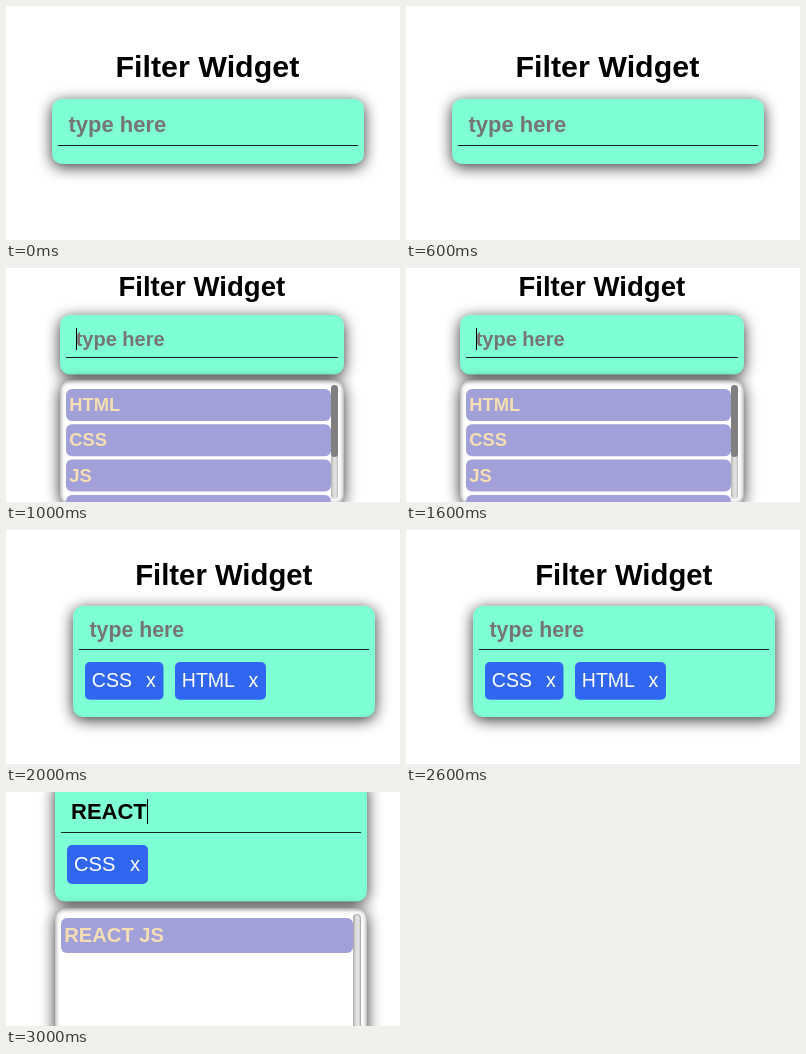
Animation, 394 px wide and 234 px high, one loop 4 s. Source, as an HTML page:

```html
<!DOCTYPE html>
<html lang="en">
<head>
<meta charset="utf-8">
<title>Filter Widget</title>
<style>
  html, body { margin: 0; width: 100%; height: 100%; overflow: hidden; background: #fff; }
  svg { display: block; width: 100%; height: 100%; }
  text { font-family: "Liberation Sans", Arial, sans-serif; white-space: pre; }
  .bold { font-weight: 700; }
</style>
</head>
<body>
<svg id="stage" viewBox="0 0 394 234">
  <defs>
    <filter id="soft" x="-100" y="-100" width="600" height="500" filterUnits="userSpaceOnUse">
      <feGaussianBlur stdDeviation="7.5"/>
    </filter>
    <filter id="rim" x="-100" y="-100" width="600" height="500" filterUnits="userSpaceOnUse">
      <feGaussianBlur stdDeviation="2.5"/>
    </filter>
    <linearGradient id="track">
      <stop offset="0" stop-color="#b4b4b4"/>
      <stop offset=".4" stop-color="#dedede"/>
      <stop offset=".7" stop-color="#e2e2e2"/>
      <stop offset="1" stop-color="#b8b8b8"/>
    </linearGradient>
  </defs>
</svg>
<script>
const NS = "http://www.w3.org/2000/svg";
const stage = document.getElementById("stage");
const HOLD = 1000;
let clipCount = 0;

function add(parent, tag, attrs, content) {
  const el = document.createElementNS(NS, tag);
  for (const key in attrs) el.setAttribute(key, attrs[key]);
  if (content) el.textContent = content;
  parent.appendChild(el);
  return el;
}

function rect(g, x, y, right, bottom, r, fill, more) {
  return add(g, "rect", { x, y, width: right - x, height: bottom - y, rx: r, fill, ...more });
}

function label(g, text, x, y, size, fill, bold = true) {
  add(g, "text", { x, y, "font-size": size, fill, class: bold ? "bold" : "" }, text);
}

function shadow(g, x, y, right, bottom) {
  rect(g, x, y + 3, right, bottom + 3, 10, "#000", { opacity: 0.8, filter: "url(#soft)" });
}

function box(g, x, y, right, bottom) {
  shadow(g, x, y, right, bottom);
  rect(g, x, y, right, bottom, 10, "#7fffd4");
}

function panel(g, x, y, right, bottom) {
  shadow(g, x, y, right, bottom);
  rect(g, x, y, right, bottom, 9, "#fff");
  const id = "clip" + clipCount++;
  rect(add(g, "clipPath", { id }), x, y, right, bottom, 9, "#000");
  const inner = add(g, "g", { "clip-path": `url(#${id})` });
  rect(inner, x - 3, y - 2, right + 3, bottom + 3, 11, "none",
    { stroke: "#000", "stroke-width": 6, opacity: 0.55, filter: "url(#rim)" });
  return inner;
}

function item(g, text, x, y, right, height, size) {
  rect(g, x, y, right, y + height, 6, "#a1a0d9");
  label(g, text, x + 3.2, y + height * 0.69, size, "#f5deb3");
}

function chip(g, text, x, y, right, scale) {
  rect(g, x, y, right, y + 39 * scale, 5 * scale, "#3167f0");
  const base = y + 26 * scale, size = 20.2 * scale;
  label(g, text, x + 7 * scale, base, size, "#fff", false);
  label(g, "x", right - 18 * scale, base, size, "#fff", false);
}

function rule(g, x, right, y) {
  rect(g, x, y, right, y + 1, 0, "#10241e");
}

function caret(g, x, y, bottom) {
  rect(g, x, y, x + 1, bottom, 0, "#000");
}

function idle(g) {
  label(g, "Filter Widget", 109.5, 71, 30.4, "#000");
  box(g, 46, 93, 358, 158);
  label(g, "type here", 62.5, 126, 22, "#757575");
  rule(g, 52, 352, 139);
}

function opened(g) {
  label(g, "Filter Widget", 112.4, 28, 27.6, "#000");
  box(g, 54, 47, 338, 106.5);
  label(g, "type here", 69.7, 78, 20, "#757575");
  rule(g, 60, 332, 89);
  caret(g, 70, 60, 82);
  const inner = panel(g, 54, 112, 338, 236);
  ["HTML", "CSS", "JS", "REACT JS"].forEach((name, i) =>
    item(inner, name, 60, 121 + 35.3 * i, 325, 32, 18.4));
  rect(inner, 325, 117, 332, 231, 3.5, "url(#track)");
  rect(inner, 325, 117, 332, 189, 3.5, "#808080");
}

function picked(g) {
  label(g, "Filter Widget", 129.2, 55, 29.3, "#000");
  box(g, 67, 76, 369, 187);
  label(g, "type here", 83.5, 107, 21.3, "#757575");
  rule(g, 73, 363, 119);
  chip(g, "CSS", 79, 132, 157.5, 0.968);
  chip(g, "HTML", 169, 132, 260, 0.968);
}

function searching(g) {
  box(g, 49, -12, 361, 109.5);
  label(g, "REACT", 65, 27, 22, "#000");
  caret(g, 141, 7, 32);
  rule(g, 55, 355, 40);
  chip(g, "CSS", 61, 53, 142, 1);
  const inner = panel(g, 49, 116, 361, 254);
  item(inner, "REACT JS", 55, 126, 347, 35, 20.2);
  rect(inner, 347, 122, 355, 248, 4, "url(#track)");
  rect(inner, 347.5, 122.5, 354.5, 247.5, 3.5, "none", { stroke: "#aaa" });
}

const scenes = [idle, opened, picked, searching].map(draw => {
  const g = add(stage, "g", {});
  draw(g);
  return g;
});

function show(time) {
  const current = Math.floor(time / HOLD) % scenes.length;
  scenes.forEach((g, i) => g.setAttribute("display", i === current ? "inline" : "none"));
}

const start = performance.now();
function tick() {
  show(performance.now() - start);
  requestAnimationFrame(tick);
}
tick();
</script>
</body>
</html>
```
